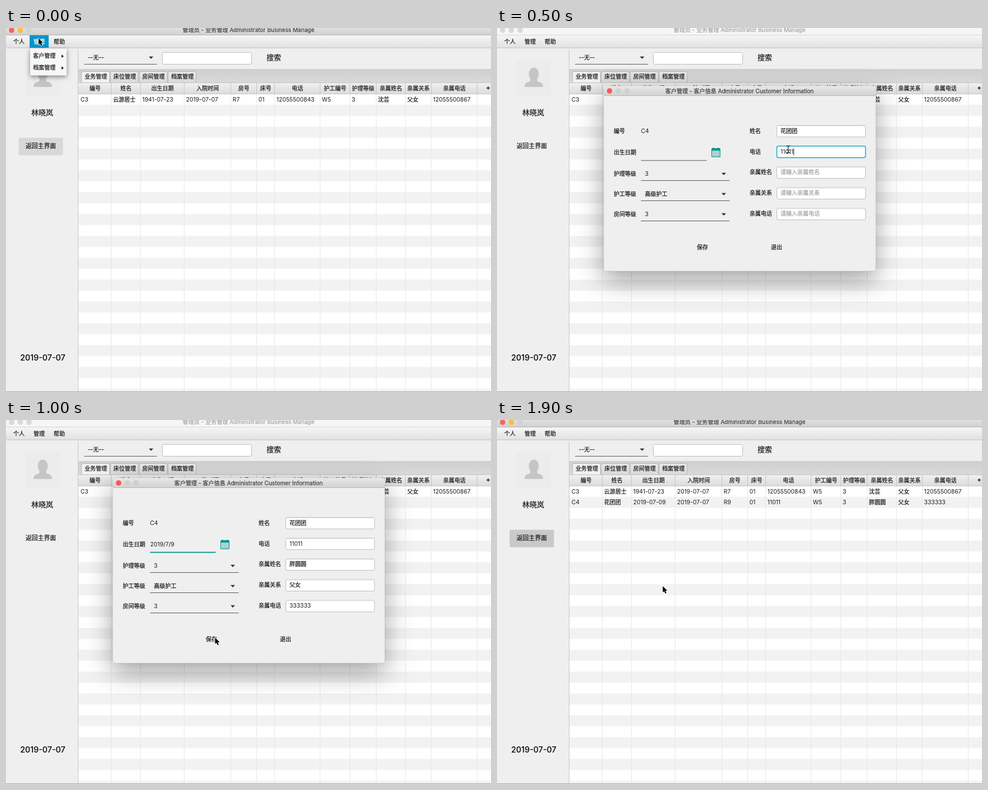
Recreate the animation shown at these times as an HTML page with a canvas. Size 864x648 px, loop 2000 ms.

```html
<!DOCTYPE html>
<html lang="zh-CN">
<head>
<meta charset="utf-8">
<style>
html, body { margin: 0; width: 100%; height: 100%; overflow: hidden; background: #efefef; }
canvas { display: block; }
</style>
</head>
<body>
<canvas id="stage" width="864" height="648"></canvas>
<script>
const c = document.getElementById('stage').getContext('2d');
const BLUE = '#0096c9', TEAL = '#009688', INK = '#1c1c1c', BODY = '#efefef';

const columns = [129, 187, 239, 317, 400, 446, 478, 559, 612, 659, 711, 757, 839];
const heads = ['编号', '姓名', '出生日期', '入院时间', '房号', '床号', '电话', '护工编号',
  '护理等级', '亲属姓名', '亲属关系', '亲属电话'];
const rows = [
  ['C3', '云游居士', '1941-07-23', '2019-07-07', 'R7', '01', '12055500843', 'W5', '3', '沈芸', '父女', '12055500867'],
  ['C4', '花团团', '2019-07-09', '2019-07-07', 'R9', '01', '11011', 'W5', '3', '胖圆圆', '父女', '333333']
];
const fields = [['姓名', '花团团'], ['电话', '11011'], ['亲属姓名', '胖圆圆'], ['亲属关系', '父女'], ['亲属电话', '333333']];

function text(s, x, y, { size, color = INK, align = 'left', weight = 400 } = {}) {
  const cjk = /[\u4e00-\u9fff]/.test(s);
  c.font = `${weight} ${size || (cjk ? 10 : 10.3)}px Inter, "Noto Sans CJK SC", "Noto Sans CJK", sans-serif`;
  c.textAlign = align;
  c.textBaseline = 'middle';
  c.fillStyle = c.strokeStyle = color;
  c.fillText(s, x, y);
  if (cjk) {  // slightly heavier Chinese strokes
    c.lineWidth = .25;
    c.strokeText(s, x, y);
  }
  return c.measureText(s).width;
}

function rect(x, y, w, h, color) {
  c.fillStyle = color;
  c.fillRect(x, y, w, h);
}

function shade(y, h, top, bottom) {
  const g = c.createLinearGradient(0, y, 0, y + h);
  g.addColorStop(0, top);
  g.addColorStop(1, bottom);
  return g;
}

function box(x, y, w, h, r, fill, stroke, line = 1) {
  c.beginPath();
  c.roundRect(x, y, w, h, r);
  c.fillStyle = fill;
  c.fill();
  if (!stroke) return;
  c.strokeStyle = stroke;
  c.lineWidth = line;
  c.stroke();
}

function shadowed(blur, dy, color, draw) {
  c.save();
  c.shadowBlur = blur;
  c.shadowOffsetY = dy;
  c.shadowColor = color;
  draw();
  c.restore();
}

function poly(color, ...p) {
  c.beginPath();
  for (let i = 0; i < p.length; i += 2) c.lineTo(p[i], p[i + 1]);
  c.closePath();
  c.fillStyle = color;
  c.fill();
}

function lights(x, y, colors) {
  colors.forEach((color, i) => {
    c.beginPath();
    c.arc(x + i * 15.5, y, 4.8, 0, 7);
    c.fillStyle = color;
    c.fill();
  });
}

function combo(s, x, right, y) {
  text(s, x + 7, y);
  rect(x, y + 11.5, right - x, 1, '#5a5a5a');
  poly('#333', right - 14.5, y - 1.8, right - 6.5, y - 1.8, right - 10.5, y + 2.4);
}

function arrow(x, y) {
  c.save();
  c.translate(x, y);
  c.beginPath();
  for (const [px, py] of [[0, 0], [0, 11.3], [2.6, 9], [4.5, 13.2], [6.5, 12.3], [4.7, 8.3], [8.1, 8.1]]) c.lineTo(px, py);
  c.closePath();
  c.lineJoin = 'round';
  c.lineWidth = 1.6;
  c.strokeStyle = '#fff';
  c.stroke();
  c.fillStyle = '#000';
  c.fill();
  c.restore();
}

function beam(x, y) {
  c.beginPath();
  for (const d of [-1, 1]) {
    c.moveTo(x - 3, y + d * 6.5);
    c.quadraticCurveTo(x, y + d * 6.5, x, y + d * 4.5);
    c.quadraticCurveTo(x, y + d * 6.5, x + 3, y + d * 6.5);
  }
  c.moveTo(x, y - 5);
  c.lineTo(x, y + 5);
  c.moveTo(x - 1.5, y + 2);
  c.lineTo(x + 1.5, y + 2);
  c.strokeStyle = '#111';
  c.lineWidth = 1.1;
  c.stroke();
}

function avatar() {
  rect(35, 57, 61, 63, '#ececec');
  c.fillStyle = '#c5c5c5';
  c.beginPath();
  c.ellipse(65.5, 82, 9, 11.5, 0, 0, 7);
  c.fill();
  c.beginPath();
  c.moveTo(60, 89);
  c.lineTo(71, 89);
  c.quadraticCurveTo(70, 95, 76, 96.5);
  c.quadraticCurveTo(82, 98, 82, 105);
  c.lineTo(49, 105);
  c.quadraticCurveTo(49, 98, 55, 96.5);
  c.quadraticCurveTo(61, 95, 60, 89);
  c.fill();
}

function table(count) {
  for (let i = 0; i < 28; i++) rect(129, 117.4 + i * 19.45, 735, 19.5, i % 2 ? '#f2f2f2' : '#fff');
  rect(129, 97, 735, 20, shade(97, 20, '#f1f1f1', '#dcdcdc'));
  rect(129, 97, 735, 1, '#c4c4c4');
  rect(129, 117, 735, 1, '#c8c8c8');
  for (const x of columns.slice(1)) {
    rect(x, 98, 1, 19, '#c4c4c4');
    rect(x, 118, 1, 530, '#e7e7e7');
  }
  heads.forEach((s, i) => text(s, (columns[i] + columns[i + 1]) / 2 + .7, 107.5, { align: 'center' }));
  rows.slice(0, count).forEach((row, r) =>
    row.forEach((s, i) => text(s, columns[i] + 3.8, 127.5 + r * 19.4)));
  rect(856, 106, 6, 1.6, '#333');
  rect(858.2, 103.8, 1.6, 6, '#333');
}

function mainWindow(active, button, count, menuOpen) {
  rect(0, 0, 864, 648, BODY);
  rect(0, 0, 864, 13, active ? shade(0, 13, '#e0e0e0', '#d0d0d0') : '#f6f6f6');
  rect(0, 12, 864, 1, active ? '#b4b4b4' : '#d5d5d5');
  lights(10, 4, active ? ['#fc605b', '#fdbc40', '#d2d2d2'] : ['#d8d8d8', '#d8d8d8', '#d8d8d8']);
  text('管理员 - 业务管理 Administrator Business Manage', 432, 4.3,
    { size: 10.1, align: 'center', color: active ? '#444' : '#a5a5a5' });

  rect(0, 13, 864, 22, shade(13, 22, '#f5f5f5', '#e2e2e2'));
  rect(0, 35, 864, 1, '#c3c3c3');
  if (menuOpen) rect(42, 13, 34, 22, BLUE);
  ['个人', '管理', '帮助'].forEach((s, i) =>
    text(s, 13 + i * 36, 24.5, { color: menuOpen && i === 1 ? '#fff' : INK }));

  avatar();
  text('林晓岚', 64.5, 151.5, { size: 13, align: 'center' });
  if (button) box(22.5, 195.5, 79, 31, 2, button);
  text('返回主界面', 62, 211, { size: 10.8, align: 'center' });
  text('2019-07-07', 65.5, 588, { size: 14.3, align: 'center', color: '#000', weight: 500 });
  rect(128, 38, 1, 610, '#c6c6c6');

  combo('--无--', 139, 269, 52.5);
  box(278.5, 43.5, 159, 21, 3, '#fff', '#bbb');
  text('搜索', 464, 53.3, { size: 13 });

  rect(129, 73, 735, 24, shade(73, 24, '#cfcfcf', '#d9d9d9'));
  ['业务管理', '床位管理', '房间管理', '档案管理'].forEach((s, i) => {
    const x = 134.5 + i * 51.4;
    box(x, 77.5, 50, 22, [3, 3, 0, 0], i ? shade(77, 20, '#e9e9e9', '#d9d9d9') : '#f1f1f1', '#b5b5b5');
    text(s, x + 25.5, 87.2, { align: 'center' });
  });
  table(count);
  rect(0, 647, 864, 1, '#a5a5a5');
}

function menu(x, y, w, items, selected, sub) {
  const h = items.length * 21 + 6;
  shadowed(8, 2, 'rgba(0,0,0,.45)', () => box(x, y, w, h, 0, '#f7f7f7'));
  items.forEach((s, i) => {
    const top = y + 3 + i * 21, color = i === selected ? '#fff' : INK;
    if (i === selected) rect(x, top, w - 1, 21, BLUE);
    text(s, x + 5.3, top + 10.8, { color });
    if (sub) poly(color, x + 56, top + 7.7, x + 59.8, top + 10.7, x + 56, top + 13.7);
  });
}

function calendar() {
  box(382, 214, 16, 16, 1.5, TEAL);
  rect(384.5, 213, 2, 3, TEAL);
  rect(393.5, 213, 2, 3, TEAL);
  rect(383.3, 218.5, 13.4, 10.2, BODY);
  for (let i = 0; i < 12; i++) rect(384.8 + i % 4 * 3, 219.9 + (i >> 2) * 3, 1.7, 1.6, TEAL);
}

function dialog(step) {
  shadowed(46, 17, 'rgba(0,0,0,.36)', () => box(190, 103, 485, 330, 4, BODY));
  box(190, 103, 485, 330, 4, BODY, 'rgba(0,0,0,.16)', .8);
  box(190, 103, 485, 17.5, [4, 4, 0, 0], shade(103, 17, '#e8e8e8', '#d2d2d2'));
  rect(190, 120, 485, 1, '#b8b8b8');
  lights(200.5, 112, ['#fc5753', '#d0d0d0', '#d0d0d0']);
  text('客户管理 - 客户信息 Administrator Customer Information', 432, 112.5,
    { size: 10.1, align: 'center', color: '#444' });

  const dated = step >= 10;
  ['编号', '出生日期', '护理等级', '护工等级', '房间等级'].forEach((s, i) =>
    text(s, 208, [183.5, 222, 260, 296, 331.5][i]));
  text('C4', 256.5, 183.5);
  if (dated) text('2019/7/9', 257, 222);
  rect(256.5, dated ? 234.7 : 235.4, 117, dated ? 1.8 : 1, dated ? TEAL : '#5a5a5a');
  calendar();
  ['3', '高级护工', '3'].forEach((s, i) => combo(s, 256.5, 414.5, 259.5 + i * 36));

  const focus = dated ? -1 : Math.min(4, Math.max(0, step - 4));
  const filled = step - 3;
  fields.forEach(([label, value], i) => {
    const y = 183.6 + i * 36.9, on = i === focus;
    text(label, 450, y);
    box(498.5, y - 10.2, 158, 20.5, 3, '#fff', on ? '#1ba6d4' : '#bcbcbc', on ? 1.5 : 1);
    if (!on) rect(500, y - 9.6, 155, 1, '#ececec');
    const typed = i < filled ? (i === 4 && step === 8 ? value[0] : value) : '';
    const w = text(typed, 505, y);
    if (on) rect(505 + w, y - 6, 1, 12, '#222');
    else if (!typed) text('请输入' + label, 505, y, { color: '#a3a3a3' });
  });
  text('保存', 366, 390.5, { align: 'center' });
  text('退出', 498, 390.5, { align: 'center' });

  if (!dated) beam(512.8 + focus * 5.9, 177 + focus * 39);
  else if (step < 14) arrow(372.5, 387.5);
  else arrow(361.5, 391.5);
}

function draw(now) {
  const step = Math.floor(now % 2000 / 100);
  const editing = step >= 3 && step < 18;
  mainWindow(!editing, editing ? '' : step ? '#c9c9c9' : '#d8d8d8', step >= 18 ? 2 : 1, step < 3);
  if (editing) dialog(step);
  else if (step < 3) {
    menu(43, 36.5, 65, ['客户管理', '档案管理'], step ? 0 : -1, true);
    if (step) menu(108, 40.5, 77, ['新增客户', '删除客户', '修改客户信息'], 0);
    if (step) arrow(132.3, 50.5);
    else arrow(58, 18.5);
  } else if (step === 18) arrow(361.8, 392);
  else arrow(295.3, 295.7);
  requestAnimationFrame(draw);
}
requestAnimationFrame(draw);
</script>
</body>
</html>
```
